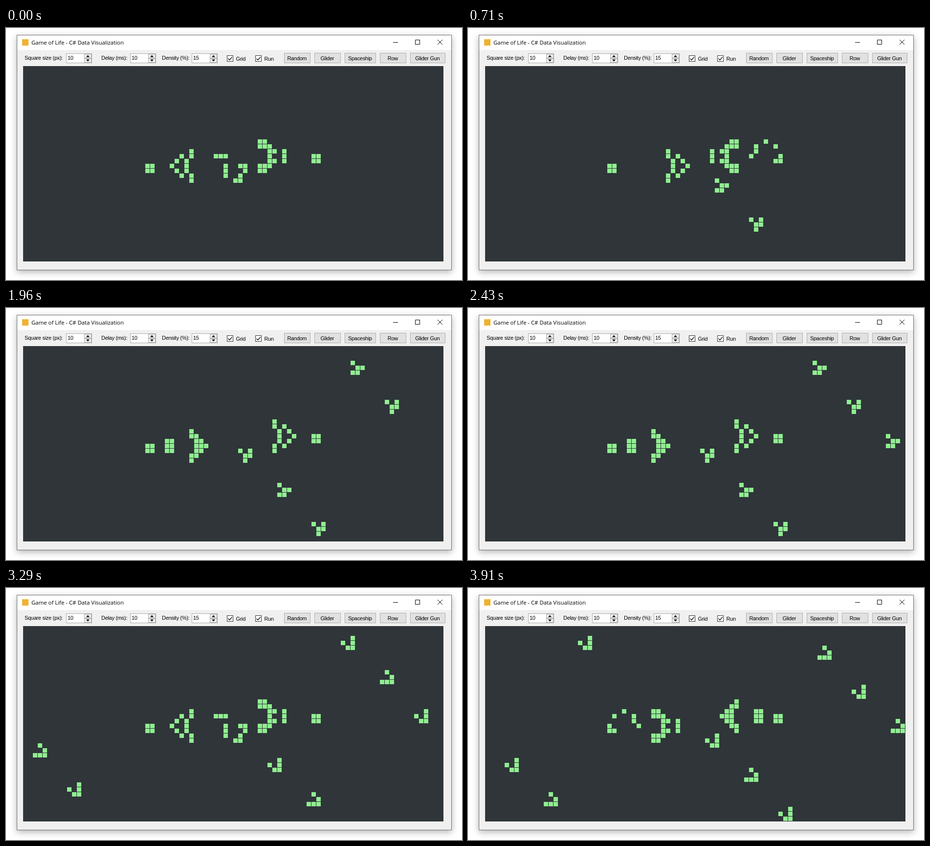
An HTML page with a canvas for the animation above (3.99 s loop, 933x516 px).

```html
<!DOCTYPE html>
<html lang="en">
<head>
<meta charset="utf-8">
<title>Game of Life</title>
<style>
  html, body { margin: 0; width: 100%; height: 100%; overflow: hidden; background: #fff; }
  .window {
    position: absolute; left: 22px; top: 14px; width: 890px; height: 482px;
    box-sizing: border-box; border: 1px solid #707070;
    background: linear-gradient(#fff 30px, #f0f0f0 30px);
    box-shadow: 0 4px 13px rgba(0, 0, 0, .3);
  }
  svg { position: absolute; left: 0; top: 0; }
  canvas { position: absolute; left: 35px; top: 78px; }
  text { font: 11px "Liberation Sans", Arial, sans-serif; letter-spacing: -.3px; fill: #000; }
  text.title { font: 11.4px "Open Sans", "Noto Sans", sans-serif; letter-spacing: 0; }
  .button text { text-anchor: middle; }
  .button rect { fill: #e1e1e1; stroke: #adadad; }
  .line { fill: none; stroke: #000; }
</style>
</head>
<body>
<div class="window"></div>
<svg id="chrome" width="933" height="516" viewBox="0 0 933 516">
  <rect x="33" y="23" width="13" height="13" fill="#f0b232"/>
  <text class="title" x="52" y="34">Game of Life - C# Data Visualization</text>
  <path class="line" d="M792 29.5h10M837.5 24.5h9v9h-9z"/>
  <path class="line" d="M883 24l10 10M893 24l-10 10"/>
</svg>
<canvas id="board" width="860" height="400"></canvas>
<script>
const COLS = 86, ROWS = 40, CELL = 10;
const GENERATIONS_PER_STEP = 5, LOOP = 3990;

// Start time of each step, in ms
const STARTS = [
  0, 70, 150, 220, 300, 380, 450, 530,
  620, 710, 770, 850, 930, 1000, 1080,
  1160, 1240, 1310, 1400, 1480, 1550, 1630,
  1720, 1800, 1880, 1960, 2040, 2120, 2190,
  2280, 2350, 2430, 2510, 2590, 2670, 2740,
  2810, 2890, 2970, 3050, 3130, 3210, 3290,
  3360, 3440, 3510, 3590, 3670, 3740, 3820, 3910
];

// Glider gun in run-length notation: b = dead, o = alive, $ = next row
const GUN = "23b2o$23b3o$9bo15b2obo$7bobo4b3o8bo2bo5b2o$6bobo16b2obo5b2o$" +
  "2o3bo2bo7bo2b2o2b3o$2o4bobo7bo3bo2b2o$7bobo6bo2bo$9bo8b2o";

function buildChrome() {
  const parts = [];
  const label = (x, y, text) => parts.push(`<text x="${x}" y="${y}">${text}</text>`);

  const spinner = (x, value) => {
    parts.push(`<g transform="translate(${x} 52)">
      <rect x=".5" y=".5" width="52" height="19" fill="#fff" stroke="#ababab"/>
      <rect x="37.5" y="1.5" width="14" height="8" fill="#f0f0f0" stroke="#acacac"/>
      <rect x="37.5" y="10.5" width="14" height="8" fill="#f0f0f0" stroke="#acacac"/>
      <path d="M41 7.5h7l-3.5-4zM41 12.5h7l-3.5 4z"/>
    </g>`);
    label(x + 3, 65, value);
  };

  const checkbox = (x, text) => {
    parts.push(`<g transform="translate(${x} 56)">
      <rect x=".5" y=".5" width="12" height="12" fill="#fff" stroke="#333"/>
      <path class="line" stroke-width="1.2" d="M2.5 6.5l3 3l5-6"/>
    </g>`);
    label(x + 18.5, 67, text);
  };

  const button = (x, width, text) => parts.push(`<g class="button">
    <rect x="${x + .5}" y="51.5" width="${width - 1}" height="20"/>
    <text x="${x + width / 2 - .7}" y="66">${text}</text>
  </g>`);

  label(38, 65, "Square size (px):");
  spinner(123, 10);
  label(195, 65, "Delay (ms):");
  spinner(254, 10);
  label(319, 65, "Density (%):");
  spinner(380, 15);
  checkbox(452, "Grid");
  checkbox(510, "Run");
  button(569, 54, "Random");
  button(631, 54, "Glider");
  button(693, 64, "Spaceship");
  button(765, 54, "Row");
  button(827, 72, "Glider Gun");
  document.getElementById("chrome").insertAdjacentHTML("beforeend", parts.join(""));
}

function seed(pattern, left, top) {
  const cells = new Uint8Array(COLS * ROWS);
  pattern.split("$").forEach((line, row) => {
    let col = left;
    for (const [, count, kind] of line.matchAll(/(\d*)([bo])/g)) {
      const end = col + Number(count || 1);
      if (kind === "o") cells.fill(1, (top + row) * COLS + col, (top + row) * COLS + end);
      col = end;
    }
  });
  return cells;
}

// One generation on a board whose edges wrap around
function evolve(cells) {
  return cells.map((alive, i) => {
    const col = i % COLS, row = Math.floor(i / COLS);
    let neighbours = -alive;
    for (let dy = -1; dy <= 1; dy++) {
      const y = (row + dy + ROWS) % ROWS;
      for (let dx = -1; dx <= 1; dx++) {
        neighbours += cells[y * COLS + (col + dx + COLS) % COLS];
      }
    }
    return neighbours === 3 || (alive && neighbours === 2) ? 1 : 0;
  });
}

function buildHistory() {
  const history = [seed(GUN, 25, 15)];
  while (history.length < STARTS.length) {
    let cells = history[history.length - 1];
    for (let n = 0; n < GENERATIONS_PER_STEP; n++) cells = evolve(cells);
    history.push(cells);
  }
  return history;
}

const board = document.getElementById("board").getContext("2d");

function draw(cells) {
  board.fillStyle = "#2f3539";
  board.fillRect(0, 0, COLS * CELL, ROWS * CELL);
  board.fillStyle = "#90ee90";
  cells.forEach((alive, i) => {
    if (alive) board.fillRect(i % COLS * CELL, Math.floor(i / COLS) * CELL, CELL - 1, CELL - 1);
  });
}

buildChrome();
const history_ = buildHistory();
let shown = 0;
draw(history_[0]);

function tick() {
  const time = performance.now() % LOOP;
  const step = STARTS.findLastIndex(start => start <= time);
  if (step !== shown) draw(history_[shown = step]);
  requestAnimationFrame(tick);
}
requestAnimationFrame(tick);
</script>
</body>
</html>
```
